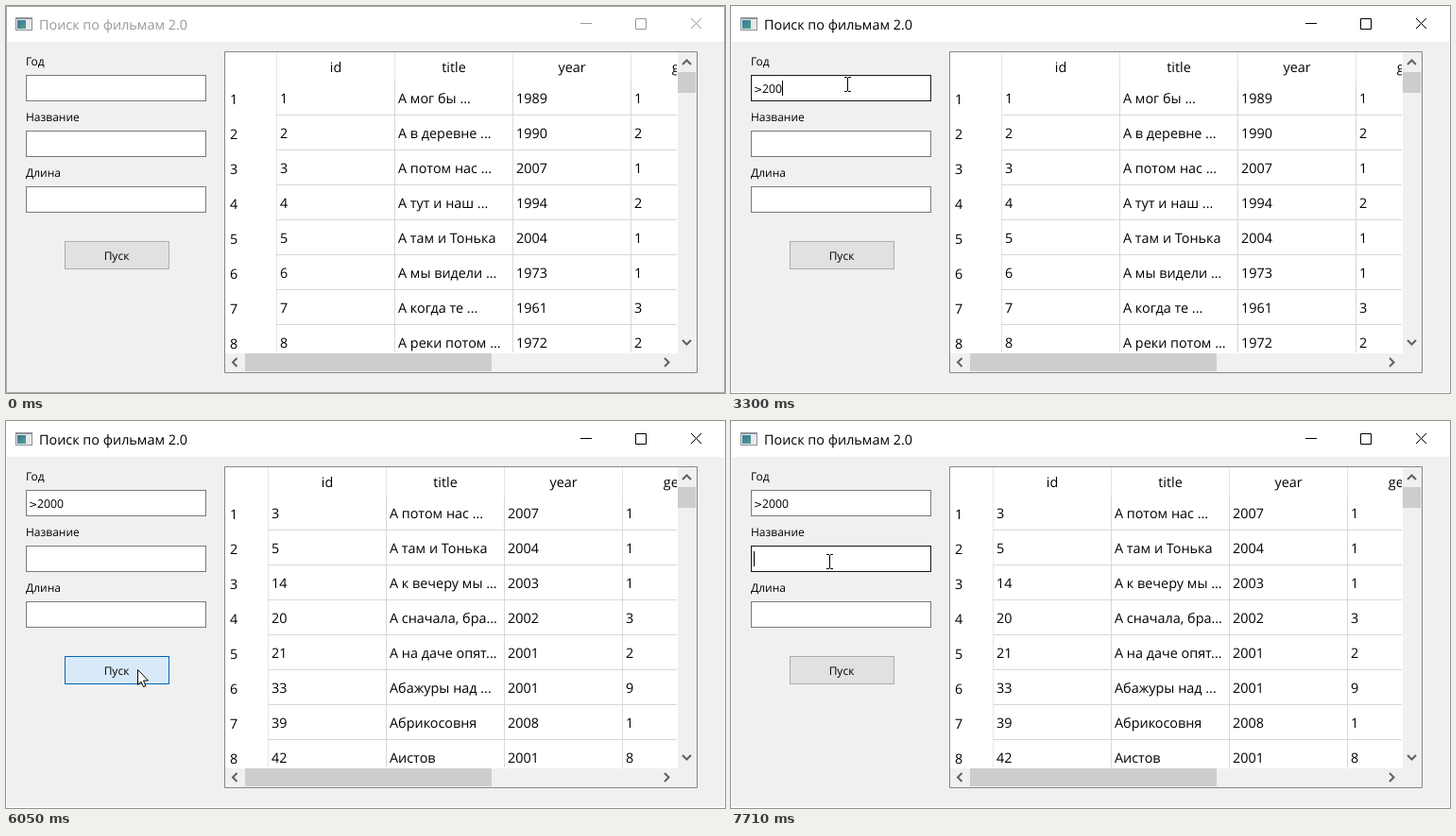
An HTML page for the animation above (8 s loop, 761 px wide and 410 px high).

```html
<!DOCTYPE html>
<html lang="ru">
<head>
<meta charset="utf-8">
<title>Поиск по фильмам 2.0</title>
<style>
  html, body { margin: 0; width: 100%; height: 100%; overflow: hidden; background: #f0f0f0; }
  svg { display: block; }
  text { font: 14.4px "Open Sans", "Noto Sans", sans-serif; text-rendering: geometricPrecision; white-space: pre; }
  .small { font-size: 12px; font-weight: 500; }
  .entry { font-size: 12.25px; font-weight: 500; }
  #sign { font: 11px "DejaVu Sans", sans-serif; }
  .mid { text-anchor: middle; }
  .line { fill: none; stroke: currentColor; }
  .chevron { fill: none; stroke: #606060; stroke-width: 2; }
</style>
</head>
<body>
<svg id="stage" width="761" height="410" viewBox="0 0 761 410">
  <defs>
    <linearGradient id="pane" x2="1" y2="1">
      <stop stop-color="#35749a"/><stop offset="1" stop-color="#55a08c"/>
    </linearGradient>
    <clipPath id="view"><path d="M232 49h478v318h-478z"/></clipPath>
  </defs>
  <path fill="#f0f0f0" d="M0 0h761v410H0z"/>
  <path fill="#fff" d="M1 1h759v37H1z"/>
  <path id="edge" class="line" d="M.5 .5h760v409H.5z"/>
  <path fill="#8b9299" d="M10 12h18v14H10z"/>
  <path fill="#e6e9eb" d="M11 14h16v11H11z"/>
  <path fill="url(#pane)" d="M12 15h9v9h-9z"/>
  <g id="caption">
    <text x="35" y="25" fill="currentColor">Поиск по фильмам 2.0</text>
    <path class="line" d="M608 18.5h12M666.5 13.5h11v11h-11zM725 13l11 11M736 13l-11 11"/>
  </g>
  <g id="form"></g>
  <rect id="button" x="62.5" y="249.5" width="110" height="29"/>
  <text class="small mid" x="117" y="269">Пуск</text>
  <text class="entry" y="92"><tspan id="sign" x="24"></tspan><tspan id="digits" x="33"></tspan></text>
  <path id="caret" class="line" d="M.5 0v16"/>

  <path fill="#fff" stroke="#828790" d="M231.5 48.5h500v340h-500z"/>
  <g id="before" clip-path="url(#view)"></g>
  <g id="after" clip-path="url(#view)"></g>
  <path fill="#f0f0f0" d="M711 49h20v339H232v-20h479z"/>
  <path fill="#cdcdcd" d="M711 70h19v22h-19zM253 368h261v19H253z"/>
  <path class="chevron" d="M716 62l4.5-4.5 4.5 4.5M716 354l4.5 4.5 4.5-4.5M244.5 373l-4.5 4.5 4.5 4.5M697 373l4.5 4.5-4.5 4.5"/>

  <path id="arrow" fill="#fff" stroke="#000" d="M.5 .5V16.5L4 13.2 6.5 18.5 9 17.5 6.5 12H11.5Z"/>
  <path id="beam" class="line" d="M-3 -7.5H0M1 -7.5H4M.5 -7V7M-3 7.5H0M1 7.5H4"/>
</svg>
<script>
const LOOP = 8000;
const el = id => document.getElementById(id);
const put = (node, attrs) => { for (const k in attrs) node.setAttribute(k, attrs[k]); };
const show = (node, on) => put(node, { visibility: on ? "visible" : "hidden" });

const fieldTops = [73, 132, 191];
el("form").innerHTML = ["Год", "Название", "Длина"].map((label, i) =>
  `<text class="small" x="21" y="${fieldTops[i] - 10}">${label}</text>
   <rect x="21.5" y="${fieldTops[i] + .5}" width="190" height="27" fill="#fff"/>`).join("");
const fields = document.querySelectorAll("#form rect");

// Columns start at `left`; each is 125 px wide, each row 37 px high.
function buildTable(id, left, rows) {
  const cols = [0, 1, 2, 3].map(i => left + 125 * i);
  const text = (x, y, s, cls = "") => `<text class="${cls}" x="${x}" y="${y}">${s}</text>`;
  let out = "";
  cols.forEach((x, i) => {
    out += `<path class="line" color="#e5e5e5" d="M${x + .5} 49v31"/>
            <path class="line" color="${i ? "#d8d8d8" : "#e5e5e5"}" d="M${x + .5} 80v288"/>`;
    out += text(x + 63, 70, ["id", "title", "year", "genre"][i], "mid");
  });
  rows.forEach((row, r) => {
    const y = 103 + 37 * r;
    out += `<path class="line" color="#d8d8d8" d="M${left} ${y + 12.5}H711"/>`;
    out += text(237, y + 1, r + 1);
    row.forEach((cell, i) => out += text(cols[i] + 4, y, cell));
  });
  el(id).innerHTML = out;
}
buildTable("before", 286, [
  [1, "А мог бы ...", 1989, 1],
  [2, "А в деревне ...", 1990, 2],
  [3, "А потом нас ...", 2007, 1],
  [4, "А тут и наш ...", 1994, 2],
  [5, "А там и Тонька", 2004, 1],
  [6, "А мы видели ...", 1973, 1],
  [7, "А когда те ...", 1961, 3],
  [8, "А реки потом ...", 1972, 2]
]);
buildTable("after", 277, [
  [3, "А потом нас ...", 2007, 1],
  [5, "А там и Тонька", 2004, 1],
  [14, "А к вечеру мы ...", 2003, 1],
  [20, "А сначала, бра...", 2002, 3],
  [21, "А на даче опят...", 2001, 2],
  [33, "Абажуры над ...", 2001, 9],
  [39, "Абрикосовня", 2008, 1],
  [42, "Аистов", 2001, 8]
]);

// Keys are [time, ...values]; values run linearly between them.
function track(keys, t) {
  const n = keys.findIndex(k => k[0] > t);
  if (n === 0) return keys[0].slice(1);
  if (n < 0) return keys[keys.length - 1].slice(1);
  const a = keys[n - 1], b = keys[n], p = (t - a[0]) / (b[0] - a[0]);
  return a.slice(1).map((v, i) => v + (b[i + 1] - v) * p);
}
const mix = (a, b, p) => a.map((v, i) => v + (b[i] - v) * p);
const rgb = c => `rgb(${c.map(Math.round)})`;
const within = (t, spans) => spans.some(([a, b]) => t >= a && t < b);

const pointer = [
  [70, 446, 349], [430, 250, 190], [790, 119, 83], [1199, 119, 83], [1200, 123, 83],
  [5090, 123, 83], [5320, 140, 225], [5400, 142, 243], [5480, 141, 251], [5880, 139, 262],
  [6050, 139, 263], [6300, 139, 263], [6760, 125, 220], [7150, 111, 192],
  [7230, 109, 167], [7570, 104, 149]
];
const hover = [[5470, 0], [5620, 1], [6440, 1], [6600, .1], [7639, .1], [7640, 0]];
const press = [[5860, 0], [5880, 1], [5980, 1], [6130, 0]];
const caretOn = [[970, 1500], [1960, 2590], [2990, 3830], [4390, 5090], [7640, LOOP]];
const keyTimes = [1960, 2990, 3060, 3300, 4460];

const fieldAt = ([x, y]) =>
  x >= 21 && x < 212 ? fieldTops.findIndex(top => y >= top && y < top + 28) : -1;

function draw(t) {
  const active = t >= 890;
  put(el("caption"), { color: active ? "#000" : "#999" });
  put(el("edge"), { color: active ? "#fff" : "#aaa" });

  const focus = within(t, [[970, 5880]]) ? 0 : t >= 7640 ? 1 : -1;
  const hot = fieldAt(track(pointer, t - 80)); // highlight trails the pointer
  fields.forEach((f, i) => put(f, {
    stroke: i === hot ? "#171717" : i === focus ? "#0078d7" : "#7a7a7a"
  }));

  const typed = ">2000".slice(0, keyTimes.filter(k => k <= t).length);
  el("sign").textContent = typed.slice(0, 1);
  el("digits").textContent = typed.slice(1);
  const caretX = focus === 0 && typed ? 26 + 7 * typed.length : 24;
  put(el("caret"), { transform: `translate(${caretX} ${focus === 1 ? 138 : 79})` });
  show(el("caret"), within(t, caretOn));

  const [h] = track(hover, t), [p] = track(press, t);
  put(el("button"), {
    fill: rgb(mix(mix([225, 225, 225], [229, 241, 251], h), [204, 228, 247], p)),
    stroke: rgb(mix(mix([173, 173, 173], [0, 120, 215], h), [0, 84, 153], p))
  });

  show(el("before"), t < 5980);
  show(el("after"), t >= 5980);

  const pos = track(pointer, t).map(Math.round), overField = fieldAt(pos) >= 0;
  for (const id of ["arrow", "beam"]) {
    put(el(id), { transform: `translate(${pos})` });
    show(el(id), t >= 70 && overField === (id === "beam"));
  }
}

const start = performance.now();
function tick() {
  draw((performance.now() - start) % LOOP);
  requestAnimationFrame(tick);
}
tick();
</script>
</body>
</html>
```
